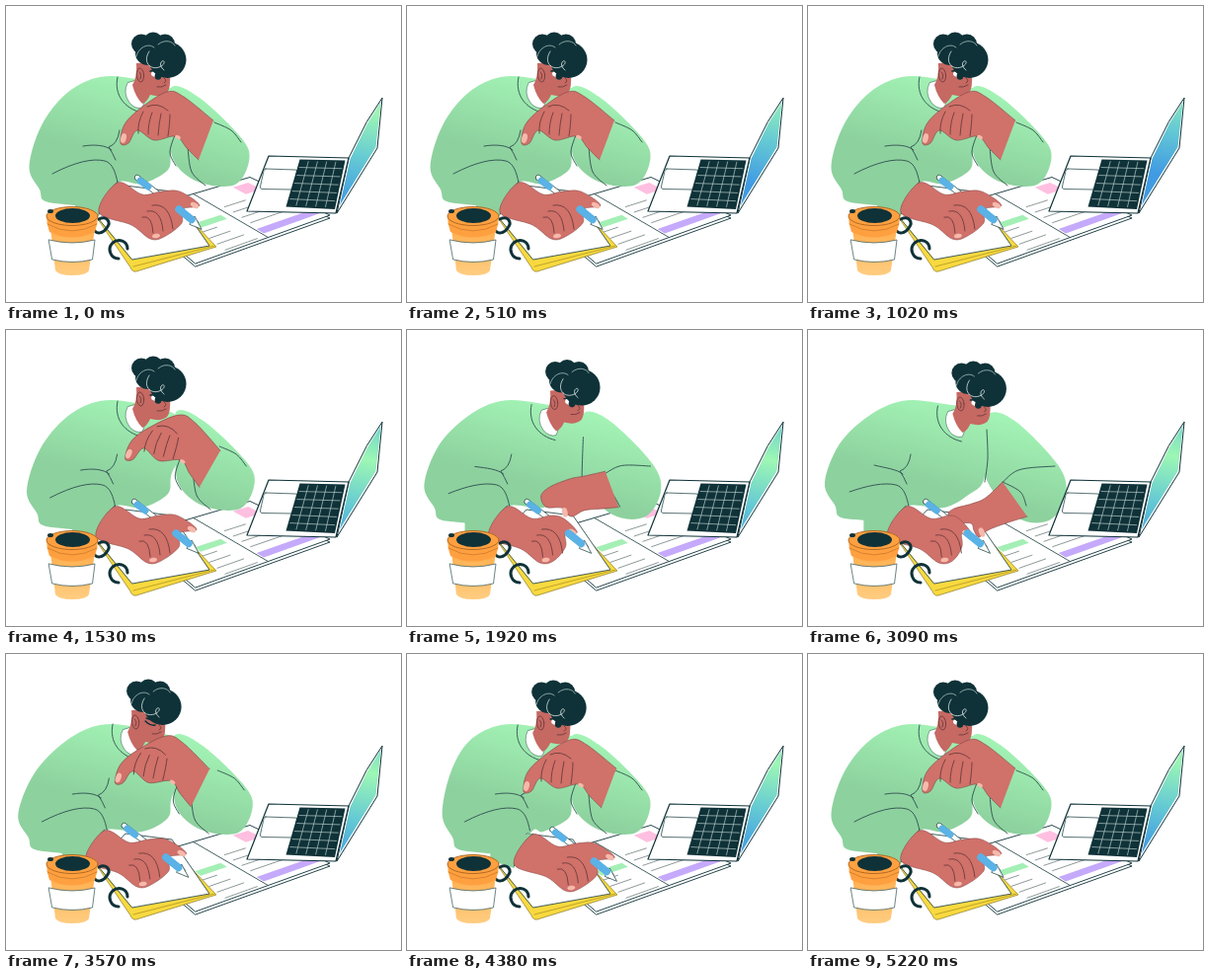
Recreate the animation shown at these times as an HTML page with a canvas. Size 400 by 300 pixels, loop 5250 ms.

```html
<!DOCTYPE html>
<html lang="en">
<head>
<meta charset="utf-8">
<title>Student at a desk</title>
<style>
html, body { margin: 0; width: 100%; height: 100%; overflow: hidden; background: #fff; }
canvas { display: block; width: 400px; height: 300px; }
</style>
</head>
<body>
<canvas id="stage"></canvas>
<script>
const LOOP = 5250, STEP = 30;
const INK = '#2f4f50', DARK = '#0f3238', SKIN = '#d0716a', FACE = '#c66963', CREASE = '#6c3d3c', NAIL = '#f5b9ac';
const ORANGE = '#ffa040', BLUE = '#5ab2e6', YELLOW = '#f8d93f';

const canvas = document.getElementById('stage');
const c = canvas.getContext('2d');
const dpr = window.devicePixelRatio || 1;
canvas.width = 400 * dpr;
canvas.height = 300 * dpr;

const mix = (a, b, k) => a + (b - a) * k;
const blend = (a, b, k) => a.map((v, i) => mix(v, b[i], k));
const clamp = v => Math.max(0, Math.min(1, v));
const ease = (t, from, to) => (1 - Math.cos(Math.PI * clamp((t - from) / (to - from)))) / 2;
// Rises from a to b, holds, falls from d to e.
const pulse = (t, a, b, d, e) => ease(t, a, b) - ease(t, d, e);

function paint(path, fill, stroke, width = 0.9) {
  if (fill) { c.fillStyle = fill; c.fill(path); }
  if (stroke) { c.strokeStyle = stroke; c.lineWidth = width; c.stroke(path); }
}
const draw = (d, fill, stroke, width) => paint(new Path2D(d), fill, stroke, width);
const line = (d, color = INK, width = 0.9) => draw(d, null, color, width);
const poly = (pts, fill, stroke, width) => draw('M' + pts.join(' ') + 'Z', fill, stroke, width);

function oval(x, y, rx, ry, fill, stroke, turn = 0) {
  const p = new Path2D();
  p.ellipse(x, y, rx, ry, turn, 0, Math.PI * 2);
  paint(p, fill, stroke);
}

// Smooth curve through the points.
function smooth(pts, closed) {
  const n = pts.length / 2;
  const at = i => {
    i = closed ? (i + n) % n : Math.max(0, Math.min(n - 1, i));
    return [pts[2 * i], pts[2 * i + 1]];
  };
  const p = new Path2D();
  p.moveTo(pts[0], pts[1]);
  for (let i = 0; i < (closed ? n : n - 1); i++) {
    const [a, b, d, e] = [at(i - 1), at(i), at(i + 1), at(i + 2)];
    p.bezierCurveTo(b[0] + (d[0] - a[0]) / 6, b[1] + (d[1] - a[1]) / 6,
      d[0] - (e[0] - b[0]) / 6, d[1] - (e[1] - b[1]) / 6, d[0], d[1]);
  }
  return p;
}

// Flat surface seen in perspective: (u, v) in 0..1 to stage points.
function surface(tl, tr, br, bl) {
  const at = (u, v) => blend(blend(tl, tr, u), blend(bl, br, u), v);
  return {
    corners: [tl, tr, br, bl],
    rect: (u0, v0, u1, v1, ...style) => poly([at(u0, v0), at(u1, v0), at(u1, v1), at(u0, v1)], ...style),
    line: (u0, v0, u1, v1, ...style) => line(`M${at(u0, v0)} L${at(u1, v1)}`, ...style)
  };
}

function gradient(x0, y0, x1, y1, ...colors) {
  const g = c.createLinearGradient(x0, y0, x1, y1);
  colors.forEach((v, i) => g.addColorStop(i / (colors.length - 1), v));
  return g;
}

function shifted(x, y, fn, turn = 0, px = 0, py = 0) {
  c.save();
  c.translate(x + px, y + py);
  c.rotate(turn);
  c.translate(-px, -py);
  fn();
  c.restore();
}

function pose(t) {
  const table = pulse(t, 1560, 2120, 3230, 3540);
  const lean = pulse(t, 1080, 1500, 1560, 1900);
  const glance = pulse(t, 3230, 3540, 3830, 4350);
  const reach = pulse(t, 3830, 4350, 4440, 4890);
  const sway = Math.sin(2 * Math.PI * t / 1050) * 0.4;
  return {
    table,
    write: 14 * reach - 2 * lean - 13.5 * pulse(t, 1400, 2120, 3830, 4350) + sway,
    writeY: 4 * reach,
    headX: 18.5 * table - 5 * glance - reach + sway / 2,
    headY: 5 * table - glance,
    turn: 0.16 * lean + 0.1 * glance,
    armX: 7 * lean - 4 * glance + 2 * reach,
    armY: -lean - 4 * glance,
    blink: t > 3450 && t < 3680,
    glow: 0.1 - 0.3 * pulse(t, 0, 900, 1000, 1500) + 0.25 * pulse(t, 1000, 1500, 2340, 5000)
  };
}

function book() {
  const page = surface([130, 208], [247, 173.5], [328, 212], [192, 261]);
  shifted(0, 3, () => poly(page.corners, '#fff', DARK));
  poly(page.corners, '#fff', DARK);
  page.line(0.51, 0, 0.54, 1);
  page.rect(0.27, 0.44, 0.48, 0.53, '#a4efb5');
  page.rect(0.8, 0.08, 0.93, 0.25, '#ffbfe0');
  page.rect(0.55, 0.82, 0.97, 0.92, '#c5a9fb');
  for (let i = 0; i < 4; i++) {
    const v = 0.34 + 0.12 * i;
    page.line(0.57, v, 0.74 + 0.06 * i, v, '#71817f', 0.8);
    page.line(0.24, v + 0.26, 0.36 + 0.04 * i, v + 0.26, '#71817f', 0.8);
  }
}

function laptop(glow) {
  const base = surface([266, 152], [347, 154], [334, 210], [244, 208]);
  const keys = surface([297.5, 155.5], [343.5, 156.5], [333, 206], [283.5, 203.5]);
  const y = 98 + 105 * glow;
  poly([381, 93.5, 376, 144, 335, 210, 347, 154, 365, 118], '#fff', DARK, 1);
  poly([379.8, 97, 374.5, 143, 338, 202, 348.5, 155, 366, 119],
    gradient(375, y - 50, 345, y + 90, '#62cbd0', '#9df7b4', '#66cbd3', '#419be3'));
  poly(base.corners, '#fff', DARK, 1.2);
  draw('M263 165 L293 166 Q295 166 294.5 168 L292 184 Q291.5 186 290 186 L259 185.5 Q257 185 257.5 183 L261 167 Q261.5 165 263 165 Z', '#fff', INK, 0.8);
  poly(keys.corners, DARK);
  for (let i = 1; i < 6; i++) {
    keys.line(0.04, i / 6, 0.96, i / 6, '#b8cccb', 0.7);
    if (i < 5) keys.line(i / 5, 0.04, i / 5, 0.96, '#b8cccb', 0.7);
  }
}

function notebook() {
  draw('M92 214 L162 190 L213 244 L132 269 Q128 270 126 265 Z', YELLOW, '#8a7a24', 0.7);
  line('M129 264 L211 243', '#a58d20', 0.7);
  poly([92, 213, 121, 182, 168, 188, 206, 243, 128, 257], '#fff', INK);
}

function rings() {
  line('M94 216 C102 212 107 219 102 225 C98 231 92 231 90 228', DARK, 3);
  line('M123 246 C123 238 114 235 108 240 C102 246 106 256 114 256', DARK, 3);
}

function cup() {
  draw('M45 225 L50 268 Q53 273 67 273 Q82 273 84 268 L90 225 Z', gradient(0, 228, 0, 270, '#ffb051', '#ffcb7e'));
  draw('M43.5 237 Q67 243 90 237 L87.5 257 Q67 262 47 257 Z', '#fff', INK, 0.7);
  draw('M41 212 Q41 221 44 229 Q67 240 90 229 Q93 221 93 212 Z', ORANGE);
  line('M42 221 Q67 235 92 221', '#b86d20', 0.6);
  oval(67, 213, 26, 9.5, ORANGE, '#a8641f');
  oval(45, 208, 3, 2, DARK);
  oval(67.5, 212.5, 17.5, 7.5, DARK);
}

function torso(p, green) {
  const k = p.table, w = p.write;
  const back = [132, 74, 95, 72, 62, 88, 36, 121, 23.5, 163, 34, 186, 40, 198, 75, 203];
  const side = back.map((v, i) => {
    const low = clamp((back[i | 1] - 82) / 60);
    return i % 2 ? v - 8 * k * low : v + low * (0.85 * w + 5 * k);
  });
  const front = [92 + w, 209, 113 + w, 179, 138, 180, 164, 166, mix(168, 178, k), mix(145, 152, k), 185, 110, 172 + 14 * k, 86];
  paint(smooth(side.concat(front), true), green);
  shifted(0.8 * w, 0, () => {
    line(`M${47 + 6 * k} ${170 - 6 * k} C70 158 88 154 100 157 C108 159 111 169 113 179`);
    line(`M78 ${142 - 5 * k} C90 140 101 141 107 146`);
    line('M115 126 Q113 140 104 143 Q108 149 111 156');
  });
}

function cuff(green) {
  draw('M70 182 L113 178 Q99 190 94 213 L70 205 Z', green);
  line('M113 178 Q99 190 94 211');
}

function head(blink) {
  line('M113 72 C109 90 120 104 137 108');
  draw('M123 78 Q118 88 125 98 Q131 105 138 103 L142 92 L130 76 Z', '#fff', INK, 0.5);
  draw('M132 58 Q133 72 128 80 Q131 92 138 99 Q143 97 146 90 Q157 93 163 88 Q167 84 166 68 L158 56 Z', FACE);
  oval(136, 70, 3.6, 7, FACE, CREASE, -0.1);
  line('M135 67 Q138 69 136 74 M153 82 Q158 83 162 80 M160 73 Q164 76 160 78', CREASE);
  if (blink) {
    line('M146 69 Q151 74 156 73 M147 66 L155 69', DARK, 1.5);
  } else {
    oval(151, 69, 4, 3, '#fff', null, 0.3);
    oval(154, 71, 3.4, 3.8, DARK);
    line('M146 66 Q151 65 157 69', DARK, 1.4);
  }
  for (let i = 0; i < 3; i++) oval(137 + 12 * i, 38.5 - 2 * (i % 2), 10, 10, DARK);
  oval(144, 48, 13, 12, DARK);
  oval(163.5, 54.5, 19, 18.5, DARK);
  line('M132 51 C134 42 144 37 150 42 M154 39 C161 33 169 36 171 40', '#a9c3c2', 0.8);
  line('M145 46 C138 57 146 65 155 62 C163 59 160 53 157 57 Q155 61 160 65', '#dce9e8', 0.8);
}

function sleeve(p, green) {
  const k = p.table;
  const up = [168, 82, 196, 93, 236, 131, 246.5, 154, 232, 181, 194, 178, 169, 155, 167, 115];
  const down = [185, 84, 212, 94, 254, 138, 261, 168, 244, 193, 212, 190, 181, 152, 178, 110];
  shifted(p.turn * 33, 0, () => {
    paint(smooth(blend(up, down, k), true), green);
    const folds = [
      [[172, 128, 166, 148, 172, 162], [181, 101, 182, 130, 179, 154]],
      [[211, 118, 228, 126, 238, 138], [194, 158, 213, 142, 250, 138]],
      [[184, 143, 188, 168, 202, 182], [197, 154, 215, 164, 221, 178]]
    ];
    for (const [a, b] of folds) paint(smooth(blend(a, b, k)), null, INK);
  });
}

function restingArm(p) {
  const k = p.table;
  const chin = [210, 116, 180, 92, 163, 87, 137, 103, 120, 120, 116, 139, 124, 139, 133, 126, 150, 136, 172, 132, 183, 144, 195, 156];
  const desk = [197, 154, 180, 170, 166, 176, 148, 181, 142, 187, 150, 195, 165, 196, 168, 203, 173, 210, 182, 203, 200, 196, 222, 189];
  shifted(p.armX, p.armY, () => {
    paint(smooth(blend(chin, desk, k)), SKIN, '#7e4644', 0.6);
    oval(mix(119, 176, k), mix(134, 205, k), 2.8, 5, NAIL, null, mix(0.25, -0.4, k));
    c.globalAlpha = clamp(1 - 4 * k);
    for (let i = 0; i < 4; i++) {
      const x = 139 + 9 * i;
      line(`M${x} ${107 + i} Q${x - 6 + 2 * i} 118 ${x - 5 + i} ${129 + i}`, CREASE);
    }
    line('M143 102 Q154 97 164 106', CREASE);
    oval(174, 133, 3, 1.8, NAIL, null, 0.4);
    c.globalAlpha = 1;
  }, p.turn, 165, 120);
}

function penBack() {
  line('M133 174 L192 220', INK, 6);
  line('M133 174 L192 220', '#fff', 4.6);
  line('M136 177 L144 183', BLUE, 7);
}

function penFront() {
  poly([186, 221, 191, 213, 198, 226], '#fff', INK, 0.8);
  line('M175 206 L188 216.5', BLUE, 7.5);
}

function writingHand(p) {
  const k = p.table, pull = 17 * k;
  const hand = [94, 209, 113, 179, 138, 191, 157, 188, 176 - pull / 2, 188 + 4 * k, 196 - pull, 202 + 4 * k,
    178 - pull / 2, 206, 178 - pull / 2, 220, 160, 234, 146, 236, 127, 222];
  penBack();
  paint(smooth(hand, true), SKIN, '#7e4644', 0.5);
  oval(191 - pull, 202 + 4 * k, 4.5, 2.6, NAIL, null, 0.5);
  oval(152, 233, 4, 2.2, NAIL, null, -0.2);
  for (let i = 0; i < 3; i++) {
    const x = 148 - 5 * i, y = 202 + 6 * i;
    line(`M${x} ${y} Q${x + 18 - 4 * i} ${y - 3} ${x + 21 - 5 * i} ${226 + 2 * i}`, CREASE);
  }
  penFront();
}

function scene(t) {
  const p = pose(t);
  c.setTransform(dpr, 0, 0, dpr, 0, 0);
  c.fillStyle = '#fff';
  c.fillRect(0, 0, 400, 300);
  c.lineCap = c.lineJoin = 'round';
  const green = gradient(120, 68, 98, 150, '#a3f3b5', '#8dd19e');
  book();
  torso(p, green);
  sleeve(p, green);
  laptop(p.glow);
  shifted(p.headX, p.headY, () => head(p.blink));
  notebook();
  restingArm(p);
  shifted(p.write, p.writeY, () => {
    cuff(green);
    writingHand(p);
  });
  rings();
  cup();
}

const start = performance.now();
function tick(now) {
  const t = Math.max(0, now - start) % LOOP;
  scene(Math.floor(t / STEP) * STEP);
  requestAnimationFrame(tick);
}
scene(0);
requestAnimationFrame(tick);
</script>
</body>
</html>
```
